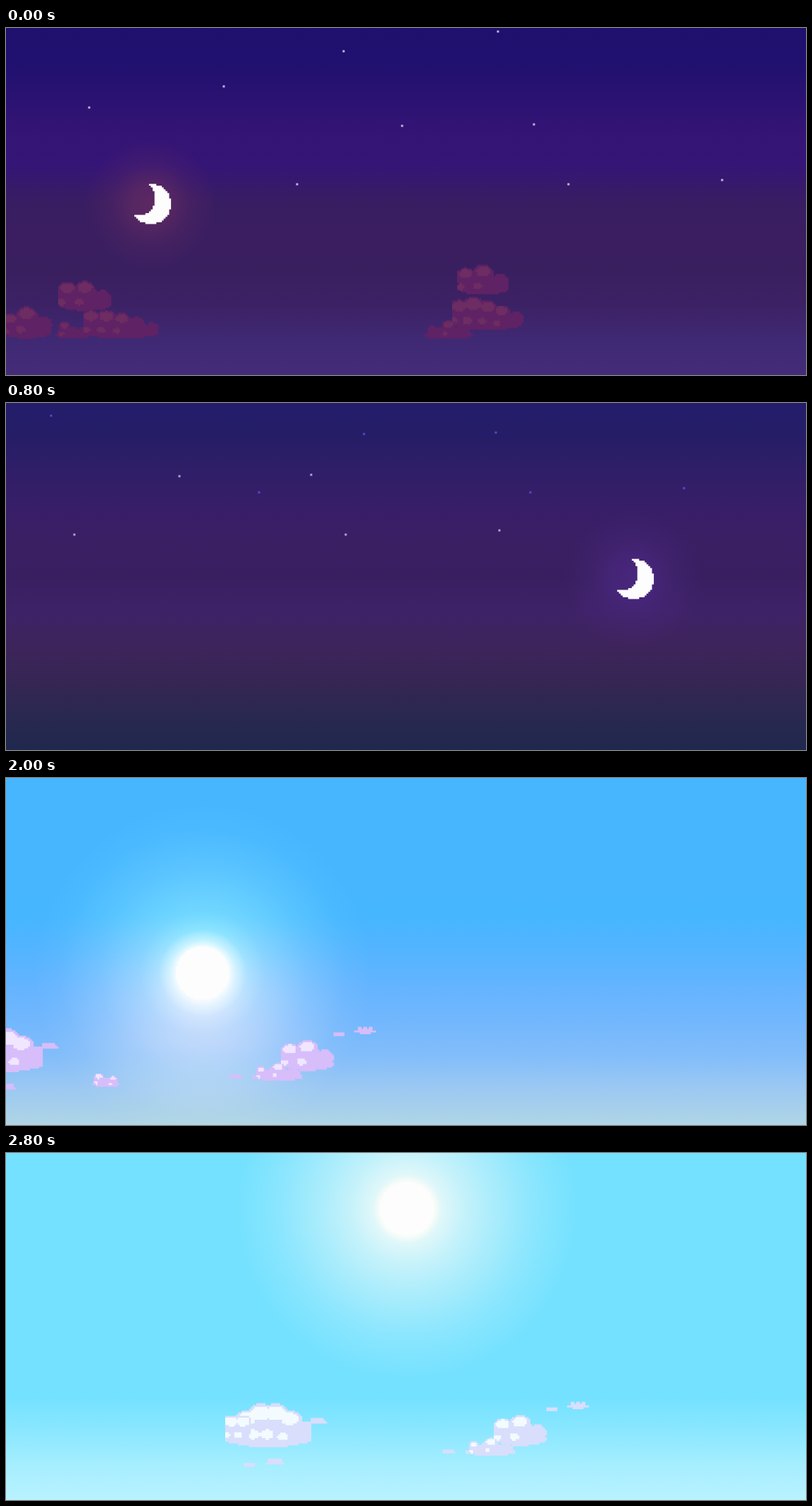
Recreate the animation shown at these times as an HTML page with a canvas. Size 1135 px wide and 493 px high, loop 3.2 s.

```html
<!DOCTYPE html>
<html lang="en">
<head>
<meta charset="utf-8">
<title>Day and night sky</title>
<style>
html, body { margin: 0; width: 100%; height: 100%; overflow: hidden; background: #1f106e; }
canvas { display: block; width: 100%; height: 100%; }
</style>
</head>
<body>
<canvas id="sky" width="1135" height="493"></canvas>
<script>
const W = 1135, H = 493, STEP = 400, CELL = 2.6;
const ctx = document.getElementById('sky').getContext('2d');

// Sky colours, evenly spaced from top to bottom
const skies = {
  dusk: '1f106e 20106f 2a1272 341475 351576 391d62 3a1e61 3a1f5f 3c2265 402974 442c78',
  night: '231d6c 251d66 301e68 381e68 3a1f64 391f60 3e2268 3e245b 362654 292850 20284e',
  dawn: '1a2380 23237f 3e247c 562379 742473 7d256e a12c5b ad2f53 a33e66 a14c6b a55c61',
  sunrise: '252ee4 342ce3 5c2cdb 812cd2 952dc9 ad30b6 c63a90 d2417c ce52a1 cd73ac d496a0',
  morning: '48b6ff 48b6ff 47b6ff 47b6ff 46b6ff 54b4ff 64b4ff 72b7fd 82bdfa 9dc9f2 afd5e4',
  day: '73e1ff '.repeat(8) + '8ae7ff a6eeff b9f2ff'
};

// A heap is [left, base, width, height, crest]; the crest is a share of the width
const duskLeft = [[-6, 441, 71, 46, .46], [70, 441, 53, 24, .25], [74, 402, 76, 46, .35], [110, 441, 108, 42, .2]];
const duskRight = [[640, 379, 74, 45, .4], [633, 429, 100, 47, .28], [593, 442, 70, 27, .5]];
const duskWisps = [[897, 439, 24, 10], [970, 436, 18, 5]];
const bigDay = [[311, 418, 122, 65, .5], [311, 412, 34, 49, .5], [427, 385, 29, 11], [335, 445, 21, 7], [366, 442, 30, 10]];
const smallDay = [[692, 416, 75, 46, .4], [652, 430, 72, 26, .45], [617, 426, 23, 7], [764, 366, 22, 7], [796, 363, 31, 12]];
const lowDay = [[122, 439, 40, 21, .4]];

const stars = [[479, 33], [309, 83], [118, 113], [698, 5], [562, 139], [749, 137], [413, 222], [798, 222], [1016, 216]];

// Glow falloffs: [share of radius, alpha]
const soft = [[0, .9], [.3, .72], [.6, .3], [1, 0]];
const wide = [[0, 1], [.155, 1], [.2, .8], [.33, .6], [.49, .42], [.73, .18], [1, 0]];
const dodge = [[0, 1], [.18, 1], [.37, .57], [.62, .26], [.85, .06], [1, 0]];
const tight = [[0, 1], [.6, .9], [.75, .4], [1, 0]];

// One entry per step; glow is [radius, rgb, falloff, blend], clouds are [heaps, shift]
const scenes = [
  {
    sky: ['dusk'], glow: [[92, '96,42,98', soft]], starColors: ['#bfb9dc'],
    clouds: [[duskLeft, 0], [duskRight, 0]], tint: ['#5f2265', '#6d2c62']
  },
  { sky: ['dusk', 'night', .5], glow: [[92, '66,34,118', soft]], starColors: ['#c6c0e0', '#6a4cc4'] },
  { sky: ['night'], glow: [[98, '74,39,128', soft]], starColors: ['#b3a5cf', '#6444c6'] },
  {
    sky: ['dawn'], glow: [[120, '222,148,112', soft]], sun: '#f0d4b8',
    clouds: [[smallDay, -582], [duskLeft, 1015], [duskWisps, 0]], tint: ['#c23f66', '#cd5066']
  },
  {
    sky: ['sunrise'], glow: [[105, '244,200,172', soft]], sun: '#fff5e2',
    clouds: [[smallDay, -460]], tint: ['rgba(207,76,164,.5)', 'rgba(222,116,160,.75)']
  },
  {
    sky: ['morning'], glow: [[240, '130,60,0', dodge, 'color-dodge'], [62, '250,254,255', tight]], sun: '#fdfdfe',
    clouds: [[bigDay, -381], [smallDay, -302], [lowDay, 0]], tint: ['#d7bdfa', '#f0e6ff']
  },
  {
    sky: ['morning', 'day', .85], glow: [[245, '240,252,255', wide]], sun: '#fdfdfe',
    clouds: [[bigDay, -190], [smallDay, -151]], tint: ['#d9d4fc', '#f2f4ff']
  },
  {
    sky: ['day'], glow: [[245, '251,253,248', wide]], sun: '#fdfdfe',
    clouds: [[bigDay, 0], [smallDay, 0]], tint: ['#d9defc', '#f3fbff']
  }
];

function moonAt(step) {
  return [205.5 + 342.5 * step, 250 - 158 * Math.sin(step * Math.PI / 2)];
}

// Waits just under the horizon, then climbs to noon in three steps
function sunAt(step) {
  const k = Math.max(step - 4, -.08);
  return [202 + 367 * Math.abs(k / 3) ** 1.42, 504 - 427 * Math.sin(k * .56), 34 + 4 * Math.min(k, 1)];
}

function paintSky(name, alpha = 1) {
  const colors = skies[name].split(' ');
  const g = ctx.createLinearGradient(0, 0, 0, H);
  colors.forEach((c, i) => g.addColorStop(i / (colors.length - 1), '#' + c));
  ctx.globalAlpha = alpha;
  ctx.fillStyle = g;
  ctx.fillRect(0, 0, W, H);
  ctx.globalAlpha = 1;
}

function paintGlow(x, y, [r, rgb, falloff, blend = 'source-over']) {
  const g = ctx.createRadialGradient(x, y, 0, x, y, r);
  for (const [at, alpha] of falloff) g.addColorStop(at, `rgba(${rgb},${alpha})`);
  ctx.globalCompositeOperation = blend;
  ctx.fillStyle = g;
  ctx.fillRect(x - r, y - r, 2 * r, 2 * r);
  ctx.globalCompositeOperation = 'source-over';
}

function paintStars(dx, dy, color) {
  ctx.fillStyle = color;
  for (const [x, y] of stars) ctx.fillRect(x + dx - 1.5, y + dy - 1.5, 3, 3);
}

// Fills the grid cells whose centre passes the test, as one path
function paintCells(x, y, w, h, color, inside) {
  ctx.fillStyle = color;
  ctx.beginPath();
  for (let cy = 0; cy < h; cy += CELL) {
    for (let cx = 0; cx < w; cx += CELL) {
      if (inside(x + cx + CELL / 2, y + cy + CELL / 2)) ctx.rect(x + cx, y + cy, CELL, CELL);
    }
  }
  ctx.fill();
}

const inEllipse = (x, y, [ex, ey, rx, ry]) => ((x - ex) / rx) ** 2 + ((y - ey) / ry) ** 2 <= 1;

function paintMoon(x, y) {
  const r = 28.6, disc = [x, y, r, r], shade = [x - 17.5, y - 8, 24, 24];
  paintCells(x - r, y - r, 2 * r, 2 * r, '#fdfdfe',
    (px, py) => inEllipse(px, py, disc) && !inEllipse(px, py, shade));
}

function paintSun(x, y, r, color) {
  paintCells(x - r, y - r, 2 * r, 2 * r, color, (px, py) => inEllipse(px, py, [x, y, r, r]));
}

// Puffs rise towards the crest over a flat base; tall ones catch the light
function paintHeap([left, base, w, h, crest = .5], dx, [bodyColor, lightColor]) {
  const x = left + dx, n = Math.max(2, Math.round(w / 22));
  const body = [[x + w / 2, base - h * .2, w / 2, h * .2], [x + w * (.3 + crest * .4), base - h * .35, w * .34, h * .34]];
  const light = [];
  for (let i = 0; i < n; i++) {
    const u = (i + .5) / n;
    const lift = 1 - Math.abs(u - crest) / Math.max(crest, 1 - crest);
    const r = h * (.22 + .16 * lift);
    const cx = x + u * w, cy = base - r - (h - 2 * r) * lift;
    body.push([cx, cy, r, r]);
    if (lift > .4 && h > 15) light.push([cx, cy - r * .4, r * .65, r * .45], [cx - r * .5, cy + r * .9, r * .4, r * .3]);
  }
  const paint = (puffs, color) => paintCells(x, base - h, w, h, color, (px, py) => puffs.some(p => inEllipse(px, py, p)));
  paint(body, bodyColor);
  paint(light, lightColor);
}

function paintScene(step) {
  const { sky: [under, over, mix], glow, starColors = [], sun, clouds = [], tint } = scenes[step];
  const [x, y, r] = sun ? sunAt(step) : moonAt(step);
  paintSky(under);
  if (over) paintSky(over, mix);
  for (const g of glow) paintGlow(x, y, g);
  // The second layer is the same field, set further along
  starColors.forEach((color, i) => paintStars(262 * i - 158 * step, -60 * i - 17.5 * step, color));
  if (sun) paintSun(x, y, r, sun);
  else paintMoon(x, y);
  for (const [heaps, dx] of clouds) {
    for (const heap of heaps) paintHeap(heap, dx, tint);
  }
}

let shown = -1;
function tick() {
  const step = Math.floor(performance.now() / STEP) % scenes.length;
  if (step !== shown) paintScene(shown = step);
  requestAnimationFrame(tick);
}
tick();
</script>
</body>
</html>
```
